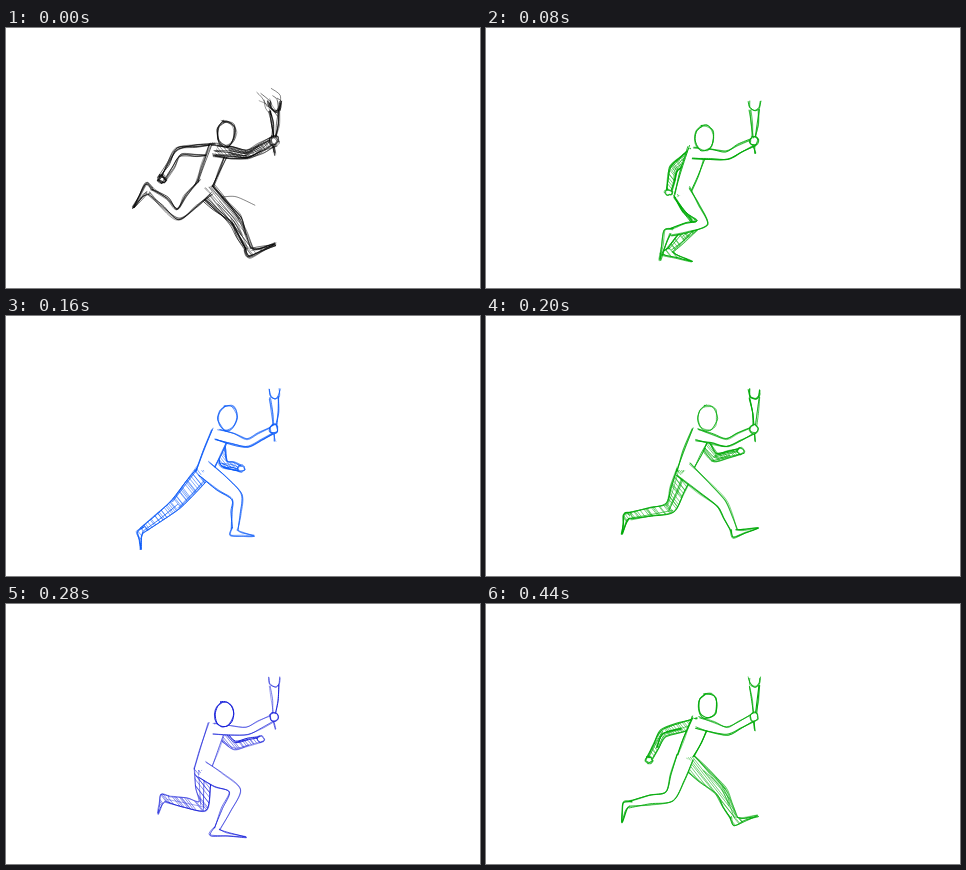
Recreate the animation shown at these times as an HTML page with a canvas. Size 474x260 px, loop 0.48 s.

```html
<!DOCTYPE html>
<html lang="en">
<head>
<meta charset="utf-8">
<title>Torch runner</title>
<style>
html, body { margin: 0; height: 100%; overflow: hidden; background: #fff }
canvas { display: block }
</style>
</head>
<body>
<canvas id="stage" width="474" height="260"></canvas>
<script>
const ctx = document.getElementById('stage').getContext('2d');
const STEP = 40, POSES = 12;

// One pencil per drawing of a stride; both strides use the same six
const black = { color: '#000', width: .65, repeats: 6, loose: 1.7, shade: 13 };
const navy = { color: '#1018d8', width: .8, repeats: 2, loose: .7, shade: 3 };
const green = { color: '#00aa08', width: .9, repeats: 3, loose: .9, shade: 6 };
const red = { color: '#f01818', width: .7, repeats: 3, loose: 1.1, shade: 3 };
const blue = { color: '#0858f8', width: .85, repeats: 3, loose: .9, shade: 5 };
const pencils = [black, navy, green, red, blue, green];

// Knee, ankle and toe of one leg through the cycle; the other is half a cycle away
const legKeys = [
  [[229, 192], [243, 221], [270, 216]],
  [[229, 187], [211, 225], [240, 233]],
  [[210, 195], [184, 222], [206, 233]],
  [[195, 194], [172, 217], [190, 234]],
  [[170, 188], [137, 214], [135, 234]],
  [[184, 192], [144, 200], [136, 218]],
  [[172, 186], [144, 163], [128, 180]],
  [[197, 202], [161, 195], [152, 210]],
  [[216, 195], [185, 204], [174, 232]],
  [[230, 178], [213, 200], [224, 217]],
  [[231, 181], [229, 213], [249, 220]],
  [[235, 187], [248, 214], [272, 212]]
];

let seed, pencil;
const random = () => (seed = seed * 16807 % 2147483647) / 2147483647;
const jitter = amount => (random() * 2 - 1) * amount;
const mix = (a, b, t) => [a[0] + (b[0] - a[0]) * t, a[1] + (b[1] - a[1]) * t];
const shift = ([x, y], dx, dy) => [x + dx, y + dy];
const direction = (a, b) => {
  const d = Math.hypot(b[0] - a[0], b[1] - a[1]) || 1;
  return [(b[0] - a[0]) / d, (b[1] - a[1]) / d];
};

// Smooth curve through all points
function curve(pts) {
  const path = new Path2D();
  path.moveTo(...pts[0]);
  for (let i = 0; i < pts.length - 1; i++) {
    const b = pts[i], c = pts[i + 1], a = pts[i - 1] || b, d = pts[i + 2] || c;
    path.bezierCurveTo(b[0] + (c[0] - a[0]) / 7, b[1] + (c[1] - a[1]) / 7,
      c[0] - (d[0] - b[0]) / 7, c[1] - (d[1] - b[1]) / 7, ...c);
  }
  return path;
}

// Repeated loose pencil lines that run a little past their ends
function sketch(pts, repeats = pencil.repeats, loose = pencil.loose) {
  for (let i = 0; i < repeats; i++) {
    const line = pts.map(p => shift(p, jitter(loose), jitter(loose)));
    const end = line.length - 1;
    line[0] = mix(line[0], line[1], -.12 * random());
    line[end] = mix(line[end], line[end - 1], -.12 * random());
    ctx.globalAlpha = .55 + .45 * random();
    ctx.lineWidth = pencil.width * (.7 + .6 * random());
    ctx.stroke(curve(line));
  }
  ctx.globalAlpha = 1;
}

function oval([x, y], rx, ry, tilt = 0) {
  const pts = Array.from({ length: 11 }, (_, i) => {
    const a = i * Math.PI / 5 - 2, px = rx * Math.cos(a), py = ry * Math.sin(a);
    return [x + px - py * tilt, y + py + px * tilt];
  });
  ctx.fill(curve(pts));
  sketch(pts);
}

function hatch(area) {
  ctx.save();
  ctx.clip(area);
  ctx.lineWidth = pencil.width * .6;
  ctx.beginPath();
  for (let x = 20; x < 300; x += 2.6) {
    ctx.moveTo(x + jitter(1), 110);
    ctx.lineTo(x + 100 + jitter(4), 236);
  }
  ctx.stroke();
  ctx.restore();
}

// Tapered limb along its joints, with a half-width at each joint
function limb(joints, widths, shaded) {
  const spine = [], radii = [];
  joints.forEach((p, i) => {
    if (i) {
      spine.push(mix(joints[i - 1], p, .5));
      radii.push((widths[i - 1] + widths[i]) * .53);
    }
    spine.push(p);
    radii.push(widths[i]);
  });
  const along = side => spine.map((p, i) => {
    const [dx, dy] = direction(spine[i - 1] || p, spine[i + 1] || p);
    return shift(p, -dy * radii[i] * side, dx * radii[i] * side);
  });
  const left = along(1), right = along(-1);
  const area = curve([...left, ...right.slice().reverse()]);
  ctx.fill(area);
  if (shaded) {
    hatch(area);
    for (let i = 0; i < pencil.shade; i++) {
      const start = Math.floor(random() * (spine.length - 2));
      sketch(along(jitter(1)).slice(start, start + 3), 1);
    }
  }
  sketch(left);
  sketch(right);
}

function leg(hip, [knee, ankle, toe], shaded) {
  limb([hip, knee, ankle], [8.5, 5.5, 3], shaded);
  const [sx, sy] = direction(knee, ankle), [fx, fy] = direction(ankle, toe);
  const heel = shift(ankle, sx * 8 - fx * 4, sy * 8 - fy * 4);
  const instep = shift(mix(ankle, toe, .35), sx, sy);
  const foot = [shift(ankle, -fx * 3, -fy * 3), heel, mix(heel, toe, .5), toe, instep, shift(ankle, fx * 3, fy * 3)];
  ctx.fill(curve(foot));
  if (shaded) hatch(curve(foot));
  sketch(foot);
}

function torch() {
  sketch([[263, 74], [264, 80], [269, 83], [273, 80], [274, 74]]);
  sketch([[264, 83], [266, 96], [267, 109]]);
  sketch([[273, 82], [272, 96], [270, 109]]);
  sketch([[268, 118], [269, 125]]);
}

// Faint searching lines around the flame and under the runner
function searching() {
  for (let i = 0; i < 9; i++) {
    const p = [251 + random() * 18, 62 + random() * 14];
    sketch([p, shift(p, 4, 5), shift(p, 7, 14)], 1, 3);
  }
  sketch([[216, 168], [230, 169], [248, 177]], 1);
}

function draw(k) {
  const bob = 4.7 * Math.sin(k * Math.PI / 3);
  const swing = Math.cos(k * Math.PI / 6), swing2 = swing * swing;
  const head = [220 - bob * .4, 106 + bob];
  const shoulder = [212 - bob * .5, 120 + bob * .8];
  const hip = [198 - bob * .3, 160 + bob * 1.4];
  const elbow = [203 - 30 * swing, 148 - 7 * swing - 17 * swing2];
  const fist = [209 - 53 * swing, 165 + 12 * swing - 26 * swing2];

  pencil = pencils[k % 6];
  seed = 977 + k * 131;
  ctx.fillStyle = '#fff';
  ctx.fillRect(0, 0, 474, 260);
  ctx.strokeStyle = pencil.color;
  ctx.lineCap = ctx.lineJoin = 'round';

  limb([shift(shoulder, -3, 2), elbow, fist], [5, 4, 2.5], pencil !== black);
  oval(fist, 3.5, 3);
  leg(hip, legKeys[k], true);

  const spine = [shift(shoulder, -8, -3), shift(mix(shoulder, hip, .5), -9, -1), shift(hip, -8, -1)];
  const chest = [shift(shoulder, 9, 5), shift(mix(shoulder, hip, .5), 9, 2), shift(hip, 9, -3)];
  ctx.fill(curve([...spine, ...chest.slice().reverse()]));
  sketch(spine);
  sketch(chest);

  leg(hip, legKeys[(k + 6) % POSES], false);
  limb([shift(shoulder, -2, 2), [241, 127], [267, 114]], [5.5, 3.7, 3.5], pencil === black);
  oval(head, 9.3, 12.5, .1);
  torch();
  oval([268, 113], 4, 4.5);
  if (pencil === black) searching();
}

let shown = -1;
function tick(now) {
  const k = Math.floor(now / STEP) % POSES;
  if (k !== shown) draw(shown = k);
  requestAnimationFrame(tick);
}
tick(0);
</script>
</body>
</html>
```
